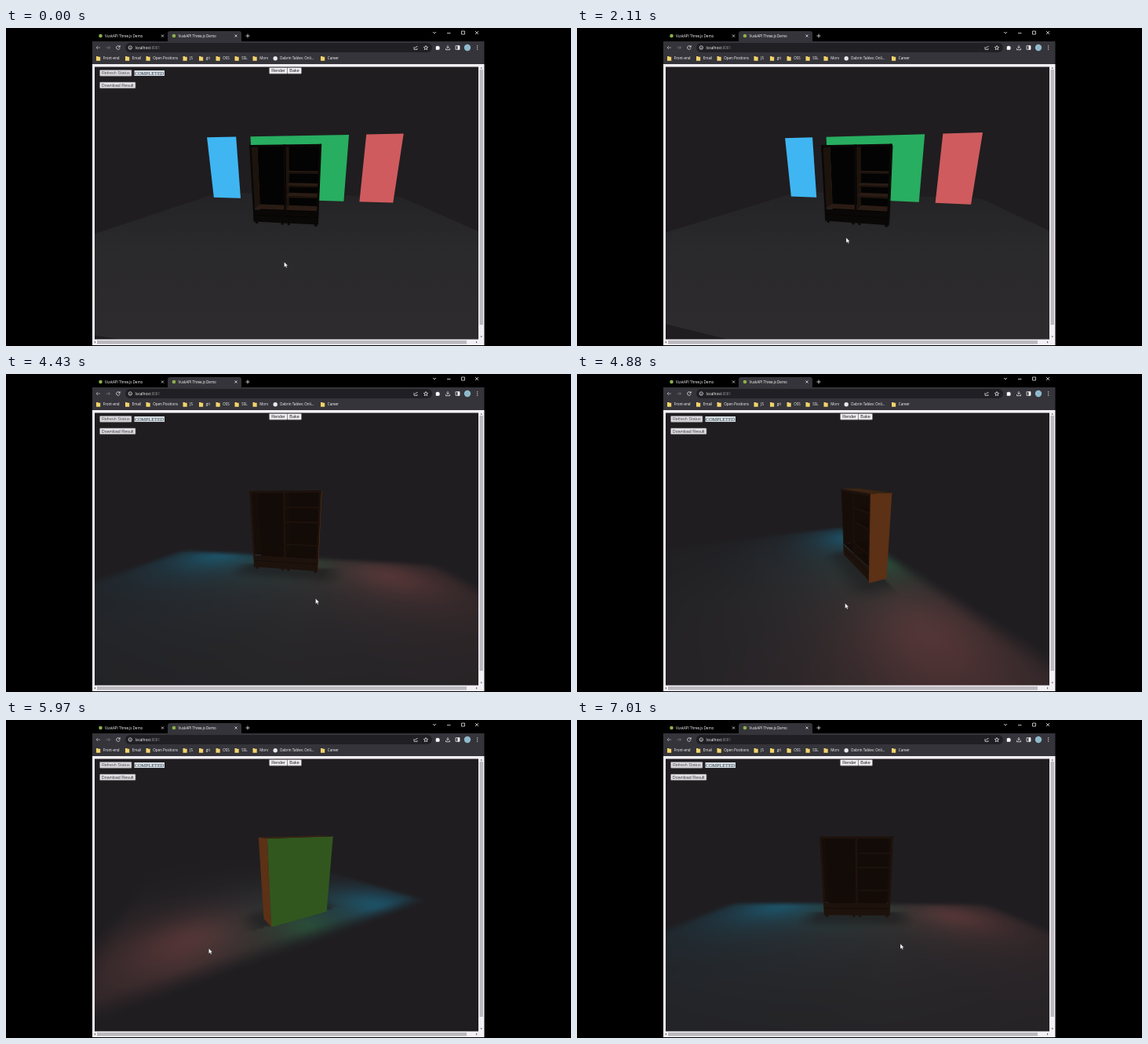
Recreate the animation shown at these times as an HTML page with a canvas. Size 720 px wide and 405 px high, loop 7.03 s.

```html
<!DOCTYPE html>
<html lang="en">
<head>
<meta charset="utf-8">
<title>Three.js Demo</title>
<style>
  html, body { margin: 0; width: 100%; height: 100%; overflow: hidden; background: #000; }
  canvas, svg { position: absolute; left: 0; top: 0; width: 720px; height: 405px; }
  text { font: 4.5px "Open Sans", "Noto Sans", sans-serif; fill: #fff; }
  .btn { font: 5.4px "Liberation Sans", Arial, sans-serif; fill: #222; text-anchor: middle; }
  .line { fill: none; stroke: #e4e4e8; stroke-width: .8; }
</style>
</head>
<body>
<canvas id="view" width="720" height="405"></canvas>
<svg viewBox="0 0 720 405">
  <!-- window frame -->
  <path fill="#35343a" d="M110 17H609.5V46H110z M206 17V7q0-3 3-3h88q3 0 3 3v10z"/>
  <path fill="#f3eff6" fill-rule="evenodd" d="M110 46H609.5V404H110z M113 49.5H602V396.5H113z"/>
  <path fill="#bcbabf" d="M603.5 53H608V378H603.5z M116 398H587V402.5H116z"/>
  <path fill="#555" d="M604.5 51.5h2.6l-1.3-1.6z M604.5 392.5h2.6l-1.3 1.6z M114 398.8v2.6l-1.6-1.3z M599 398.8v2.6l1.6-1.3z"/>
  <rect x="152" y="19" width="391" height="12" rx="6" fill="#202024"/>
  <g id="tabs"></g>
  <g class="line">
    <path d="M308 7.5v5M305.5 10h5"/>
    <path d="M544 5l2 2 2-2M562 6.5h4.5M580.5 4h4v4h-4zM598 4l4 4m0-4l-4 4"/>
    <path stroke="#a8a8ac" d="M120 25h-5l2-2m-2 2l2 2"/>
    <path stroke="#77757b" d="M127.5 25h5l-2-2m2 2l-2 2"/>
    <path d="M145 24a2.3 2.3 0 1 0 .1 1.7M145.2 22.2v2h-2"/>
    <circle cx="158.3" cy="25" r="2.2"/><path d="M158.3 24.7v1.5"/>
    <path d="M520 24v3.3h4V26M521.5 25.5q.5-2 3-2"/>
    <path d="M535 22.5l.8 1.7 1.9.2-1.4 1.3.4 1.9-1.7-1-1.7 1 .4-1.9-1.4-1.3 1.9-.2z"/>
    <path d="M563 22v3.7l-1.7-1.7m1.7 1.7l1.7-1.7M560.5 26v1.7h5V26"/>
    <path d="M573 22.7h5v4.6h-5z"/>
  </g>
  <path fill="#fff" d="M575.5 22.5h2.5v5h-2.5z M547.8 23.3h1.5q.7-1.7 1.5 0h1.5v1.4q1.6.7 0 1.5v1.5h-4.5z"/>
  <circle cx="588" cy="25" r="4.2" fill="#8fb9cb"/>
  <path fill="#fff" d="M600.2 22.3h1v1h-1z m0 2.2h1v1h-1z m0 2.2h1v1h-1z"/>
  <text x="164.5" y="26.7" style="font-size:4.7px">localhost<tspan fill="#909094">:8081</tspan></text>
  <g id="marks"></g>
  <g id="controls"></g>
  <path id="cursor" d="M0 0V6.6L1.6 5.2 2.7 7.6 3.7 7.1 2.7 4.8H4.7z" fill="#fff" stroke="#222" stroke-width=".3"/>
</svg>
<script>
const $ = id => document.getElementById(id);
const ctx = $('view').getContext('2d');
ctx.rect(112, 49, 491, 349);
ctx.clip();

// ---- static interface ----
$('tabs').innerHTML = [120.5, 214].map(x =>
  `<circle cx="${x}" cy="10" r="2.3" fill="#8db04a"/>
   <text x="${x + 5.5}" y="11.7">VuskAPI Three.js Demo</text>
   <path class="line" d="M${x + 77.5} 8.5l3 3m0-3l-3 3"/>`).join('');

const folder = x => `<path fill="#f2d36b" d="M${x} 36h2.2l.6.7h2.4v5h-5.2z"/>`;
const globe = x => `<circle cx="${x + 2.7}" cy="38.7" r="2.7" fill="#e8e8ec"/>`;
const mark = (x, label, icon = folder) => icon(x) + `<text x="${x + 8.8}" y="40.4">${label}</text>`;
$('marks').innerHTML =
  mark(115, 'Front-end') + mark(152, 'Email') + mark(178.5, 'Open Positions') + mark(225.5, 'JS') +
  mark(246, 'git') + mark(267.5, 'OSS') + mark(291.5, 'SSL') + mark(314.5, 'Morv') +
  mark(340.5, 'Dabrin Tables: Onli...', globe) + mark(401, 'Career');

const button = (x, y, w, label, bg, ink) =>
  `<rect x="${x}" y="${y}" width="${w}" height="7.7" rx=".7" fill="${bg}" stroke="#77757a" stroke-width=".6"/>
   <text class="btn" x="${x + w / 2}" y="${y + 5.75}" style="fill:${ink}">${label}</text>`;
$('controls').innerHTML =
  button(119.5, 53.5, 40.5, 'Refresh Status', '#dcdade', '#55535a') +
  button(119.5, 69, 45.5, 'Download Result', '#e4e2e6', '#36343a') +
  button(335.5, 50.5, 23, 'Render', '#f0eef2', '#222') +
  button(358.5, 50.5, 18, 'Bake', '#f0eef2', '#222') +
  `<rect x="163.5" y="54" width="38.5" height="7" fill="#d5dde2"/>
   <text x="164" y="59.7" style="font:6.2px 'Liberation Serif',Times,serif;fill:#2c3a46">COMPLETED</text>`;

// ---- pointer: [from ms, to ms, x, y], resting in between ----
const moves = [
  [30, 690, 217, 188], [750, 1360, 141, 71], [1550, 2110, 343, 267], [2290, 2400, 355.5, 268],
  [2830, 3010, 356, 272], [3550, 4210, 404, 285], [4350, 5040, 323, 294], [5070, 5730, 242, 294],
  [5870, 6560, 354, 273], [6610, 7010, 412, 285]
];
const mix = (a, b, k) => a + (b - a) * k;
const clamp = v => Math.max(0, Math.min(1, v));
const smooth = v => (v = clamp(v)) * v * (3 - 2 * v);
function pointer(t) {
  let x = 354.5, y = 298;
  for (const [from, to, tx, ty] of moves) {
    const k = clamp((t - from) / (to - from));
    x = mix(x, tx, k);
    y = mix(y, ty, k);
  }
  return [x, y];
}

// ---- camera orbiting a pivot near the wardrobe ----
const CX = 363, CY = 229, FOCAL = 226, DIST = 5.5, GROUND = -.52, PX = .15, PZ = .1;
let sa, ca, se, ce;
function aim(az, el) {
  const r = Math.PI / 180;
  sa = Math.sin(az * r); ca = Math.cos(az * r);
  se = Math.sin(el * r); ce = Math.cos(el * r);
}
function project([x, y, z]) {
  x -= PX; z -= PZ;
  const near = x * sa + z * ca;
  const s = FOCAL / (DIST - y * se - near * ce);
  return [CX + (x * ca - z * sa) * s, CY - (y * ce - near * se) * s];
}
function face(color, ...points) {
  ctx.fillStyle = color;
  ctx.beginPath();
  points.forEach(p => ctx.lineTo(...project(p)));
  ctx.fill();
}
const faceX = (c, x, y0, y1, z0, z1) => face(c, [x, y0, z0], [x, y1, z0], [x, y1, z1], [x, y0, z1]);
const faceY = (c, y, x0, x1, z0, z1) => face(c, [x0, y, z0], [x1, y, z0], [x1, y, z1], [x0, y, z1]);
const faceZ = (c, z, x0, x1, y0, y1) => face(c, [x0, y0, z], [x1, y0, z], [x1, y1, z], [x0, y1, z]);

// ---- wardrobe ----
const raw = { front: '#0a0807', back: '#040303', wall: '#1d130d', shelf: '#2a1c14', edge: '#1d130e',
  side: '#0d0a08', rear: '#080808', top: '#0a0807', shelves: [.4, .72, 1.1] };
const baked = { front: '#1e120c', back: '#130b07', wall: '#170d08', shelf: '#140b07', edge: '#1e120c',
  side: '#5c3116', rear: '#31571f', top: '#3a2413', shelves: [.36, 1.02, 1.42] };

function wardrobe(c) {
  const BOT = -.44, TOP = 1.84, REAR = -.29, FRONT = .29, BASE = -.02;
  const camX = DIST * sa * ce + PX, camY = DIST * se, camZ = DIST * ca * ce + PZ;
  for (const x of [-.93, -.1, .1, .93]) faceZ(c.front, FRONT - .06, x - .04, x + .04, GROUND, BOT);
  if (camZ > FRONT) {
    faceZ(c.back, REAR, -.97, .97, BOT, TOP);
    faceX(c.wall, -.96, BASE, TOP, REAR, FRONT);
    if (camX < .96) faceX(c.wall, .96, BASE, TOP, REAR, FRONT);
    faceY(c.shelf, BASE, -.96, .96, REAR, FRONT);
    faceX(c.wall, .04, BASE, TOP, REAR, FRONT);
    for (const y of c.shelves) {
      faceY(c.shelf, y, .04, .96, REAR, FRONT);
      faceZ(c.edge, FRONT, .04, .96, y - .04, y);
    }
    for (const x of [-.975, 0, .975]) faceZ(c.front, FRONT, x - .03, x + .03, BOT, TOP);
    faceZ(c.front, FRONT, -1, 1, TOP - .06, TOP);
    faceZ(c.front, FRONT, -1, 1, BOT, BASE - .03);
    faceZ(c.back, FRONT, -.97, .97, -.23, -.21);
  }
  if (camX > 1) faceX(c.side, 1, GROUND, TOP, REAR, FRONT);
  if (camZ < REAR) faceZ(c.rear, REAR, -1, 1, GROUND, TOP);
  if (camY > TOP) faceY(c.top, TOP, -1, 1, REAR, FRONT);
}

// ---- room with three light panels on one plane ----
function room() {
  const g = ctx.createLinearGradient(0, 212, 0, 397);
  g.addColorStop(0, '#242325');
  g.addColorStop(.4, '#2a292b');
  g.addColorStop(1, '#2d2b2d');
  faceY(g, GROUND, -5.05, 5.5, -4.9, 4.1);
  const panel = (color, x, w) => faceZ(color, -2.1, x - w / 2, x + w / 2, -.23, 2.36);
  panel('#3fb6f2', -3.1, 1.3);
  panel('#28ae60', .12, 3.9);
  panel('#cf5b5e', 3.35, 1.3);
}

// ---- baked floor light, traced coarsely and scaled up ----
const CELL = 3, COLS = 164, ROWS = 116;
const tile = document.createElement('canvas');
tile.width = COLS; tile.height = ROWS;
const tctx = tile.getContext('2d'), img = tctx.createImageData(COLS, ROWS);
const lights = [
  { x: -2.95, z: -.8, reach: 2, add: [-6, 46, 64] },
  { x: .1, z: -.7, reach: 1.2, add: [0, 30, 6] },
  { x: 3.1, z: .1, reach: 1.8, add: [48, 18, 16] },
  { x: 0, z: 1, reach: 4, add: [8, 8, 8] }
];
function floorColor(x, z) {
  const rgb = [31, 29, 32];
  const gap = Math.hypot(Math.max(Math.abs(x) - 1, 0), Math.max(Math.abs(z) - .29, 0));
  const shade = z > -.2 ? .3 + .7 * smooth(gap / .9) : 1;
  const lit = smooth((z + 1.6) / .8) * smooth((5.3 - Math.abs(x)) / .8) * shade;
  for (const l of lights) {
    const d = Math.hypot(x - l.x, z - l.z) / l.reach;
    const k = lit / (1 + d * d) ** 1.5;
    l.add.forEach((v, c) => rgb[c] += v * k);
  }
  return rgb;
}
function glow() {
  for (let j = 0, o = 0; j < ROWS; j++) for (let i = 0; i < COLS; i++, o += 4) {
    const u = (112.5 + (i + .5) * CELL - CX) / FOCAL, v = (CY - 49.5 - (j + .5) * CELL) / FOCAL;
    const dy = v * ce - se;
    let rgb = [31, 29, 32];
    if (dy < 0) {
      const s = (GROUND - DIST * se) / dy, fwd = DIST * ce - s * (ce + v * se);
      rgb = floorColor(PX + sa * fwd + s * u * ca, PZ + ca * fwd - s * u * sa);
    }
    img.data.set([...rgb, 255], o);
  }
  tctx.putImageData(img, 0, 0);
  ctx.drawImage(tile, 112.5, 49.5, COLS * CELL, ROWS * CELL);
}

// ---- frame ----
const LOOP = 7030, RELOAD = 1650, CLEAR = 2880, BAKED = 3750, DRAG = 4350;
function frame(now) {
  const t = now % LOOP, [x, y] = pointer(t);
  ctx.fillStyle = '#1f1d20';
  ctx.fillRect(112, 49, 491, 349);
  if (t < CLEAR) {
    aim(mix(8, 12, clamp((t - 30) / 660)), 15);
    room();
    wardrobe(raw);
  } else if (t >= BAKED) {
    // dragging turns the camera about one degree per pixel
    const grip = 405 + 8 * smooth((t - 5870) / 480);
    if (t < DRAG) aim(0, 15.5);
    else aim((grip - x) * 1.02, 15.5 + (y - 285) * 1.15);
    glow();
    wardrobe(baked);
  }
  $('controls').style.display = t >= RELOAD && t < CLEAR ? 'none' : '';
  $('cursor').setAttribute('transform', `translate(${x} ${y})`);
  requestAnimationFrame(() => frame(performance.now() - start));
}
const start = performance.now();
frame(0);
</script>
</body>
</html>
```
